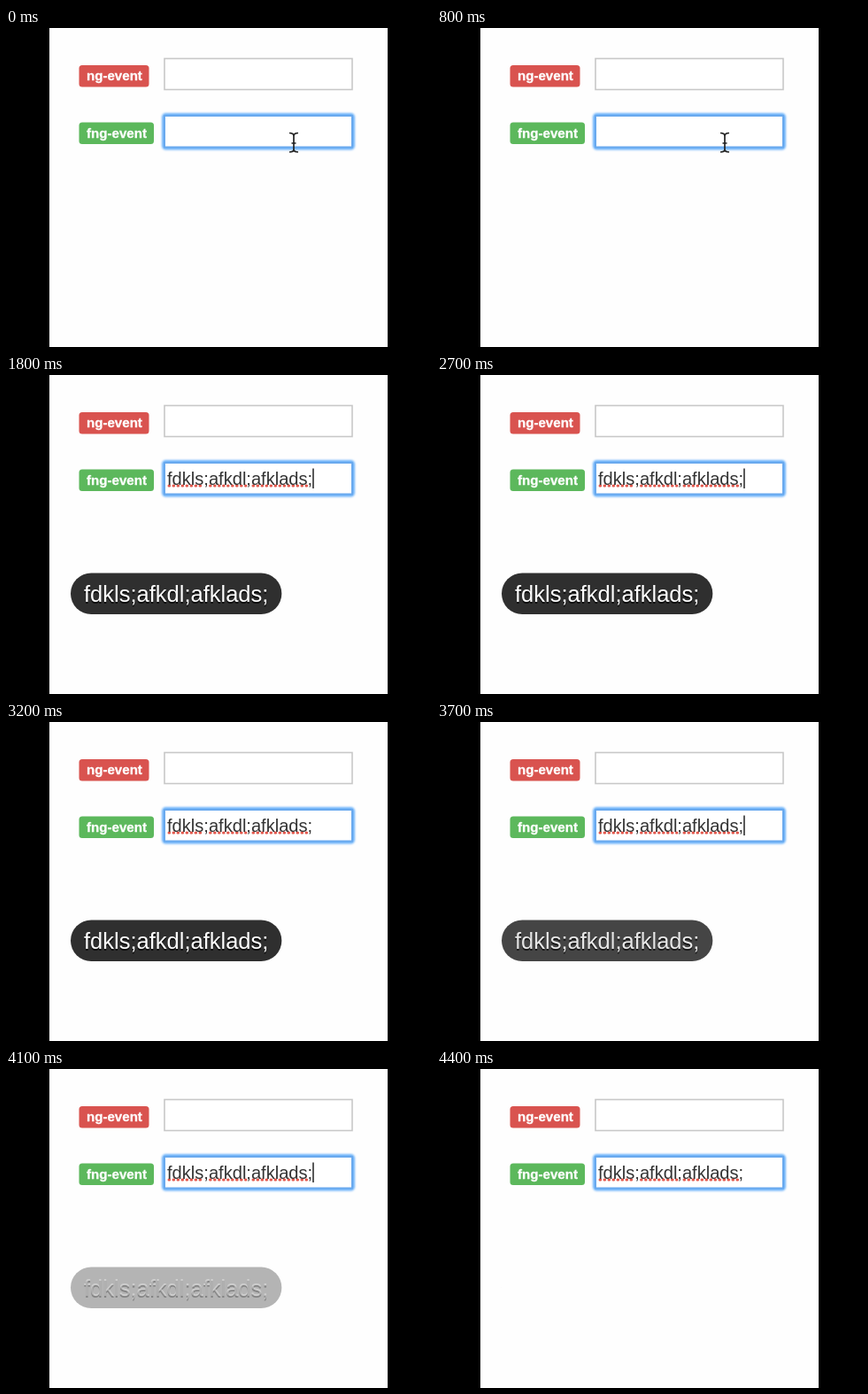
These frames come from a looping animation (480x360 px, 4700 ms). An HTML page:

```html
<!DOCTYPE html>
<html lang="en">
<head>
<meta charset="utf-8">
<title>Typing events</title>
<style>
  html, body { margin: 0; width: 100%; height: 100%; overflow: hidden; background: #000; }
  svg { display: block; width: 480px; height: 360px; }
  text { font-family: "Liberation Sans", Arial, sans-serif; white-space: pre; }
  .label { font-size: 15.1px; font-weight: bold; fill: #fff; stroke: #fff; stroke-width: .3px; }
  .value { font-size: 20.1px; fill: #333; }
  .echo { font-size: 25.5px; }
  .squiggle { stroke: #e2574c; stroke-width: 3; stroke-linecap: round; stroke-dasharray: .6 4.4; }
</style>
</head>
<body>
<svg viewBox="0 0 480 360">
  <defs>
    <filter id="glow" x="-10%" y="-40%" width="120%" height="180%">
      <feGaussianBlur stdDeviation="1.3"/>
    </filter>
  </defs>
  <rect width="480" height="360"/>
  <rect x="49" width="382" height="360" fill="#fefefe"/>

  <rect x="82.5" y="42" width="79" height="24.5" rx="3.5" fill="#d9534f"/>
  <text class="label" x="91" y="59">ng-event</text>
  <rect x="82.5" y="106.5" width="84.5" height="24.5" rx="3.5" fill="#5cb85c"/>
  <text class="label" x="91" y="123.5">fng-event</text>

  <rect x="179" y="34.5" width="212" height="35" fill="#fff" stroke="#c8c8c8" stroke-width="1.6"/>
  <rect x="178.5" y="98.5" width="213" height="36.5" rx="2" fill="none" stroke="#6cb2fa" stroke-width="5" filter="url(#glow)"/>
  <rect x="179" y="99" width="212" height="35.5" fill="#fff" stroke="#69a9ee" stroke-width="2"/>

  <g id="squiggles" class="squiggle">
    <path d="M184 125H221M230.500 125H271M279 125H341"/>
  </g>
  <text id="value" class="value" x="182" y="124"></text>
  <path id="caret" d="M0 105.500V128" stroke="#222" stroke-width="1.5"/>
  <path id="pointer" fill="none" stroke="#222" stroke-width="1.7"
    d="M320 118.500Q325 118.500 325 122V137Q325 140 320 140M330 118.500Q325 118.500 325 122M325 137Q325 140 330 140M322.500 130H327.500"/>

  <g id="bubble">
    <rect id="pill" x="73" y="223.500" height="46.500" rx="23.250" fill="#2f2f2f"/>
    <text id="shadow" class="echo" x="88" y="257.500" fill="#000" fill-opacity=".75"></text>
    <text id="echo" class="echo" x="88" y="256" fill="#fff"></text>
  </g>
</svg>
<script>
  const LOOP = 4700, STEP = 100;
  const MESSAGE = 'fdkls;afkdl;afklads;';
  const TYPE_START = 1100, TYPE_END = 1800, CHARS_PER_STEP = 2.5;
  const $ = id => document.getElementById(id);
  const between = (t, a, b) => t >= a && t < b;
  const show = (id, on) => $(id).setAttribute('visibility', on ? 'visible' : 'hidden');

  function typedCount(t) {
    if (t < TYPE_START) return 0;
    const steps = (t - TYPE_START) / STEP + 1;
    return Math.min(MESSAGE.length, Math.round(steps * CHARS_PER_STEP));
  }

  function caretOn(t) {
    if (between(t, TYPE_START, TYPE_END)) return true;
    // blinks every half second, restarted by typing
    const phase = t < TYPE_START ? 300 : 1700;
    return t >= phase && (t - phase) % 1000 < 500;
  }

  function bubbleOpacity(t) {
    if (t < 3700) return 1;
    return Math.max(0, 0.89 - (t - 3700) * 0.00133);
  }

  function render(time) {
    const t = Math.floor((time % LOOP) / STEP) * STEP;
    const text = MESSAGE.slice(0, typedCount(t));
    const alpha = bubbleOpacity(t);

    for (const id of ['value', 'echo', 'shadow']) {
      if ($(id).textContent !== text) $(id).textContent = text;
    }
    const valueWidth = text ? $('value').getComputedTextLength() : 0;
    const echoWidth = text ? $('echo').getComputedTextLength() : 0;

    $('caret').setAttribute('transform', `translate(${182.8 + valueWidth} 0)`);
    show('caret', caretOn(t));
    show('pointer', t < TYPE_START);
    show('squiggles', t >= TYPE_END);

    $('pill').setAttribute('width', echoWidth + 30);
    show('bubble', text && alpha > 0);
    for (const id of ['pill', 'shadow', 'echo']) $(id).setAttribute('opacity', alpha);
  }

  const start = performance.now();
  function tick() {
    render(performance.now() - start);
    requestAnimationFrame(tick);
  }
  tick();
</script>
</body>
</html>
```
